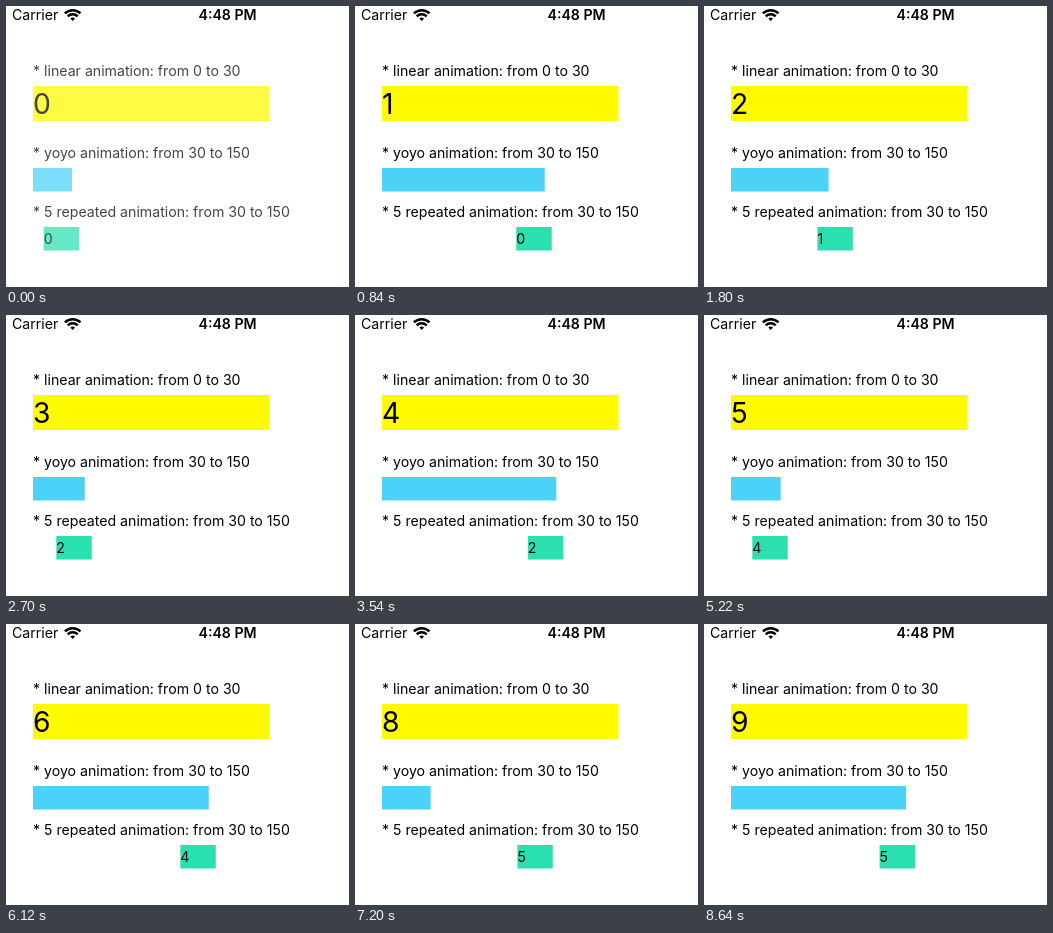
An HTML page that plays this animation: 343x281 px, repeating every 8700 ms.

```html
<!DOCTYPE html>
<html lang="en">
<head>
<meta charset="utf-8">
<title>Animated values</title>
<style>
  html, body { margin: 0; width: 100%; height: 100%; overflow: hidden; background: #fff; }
  svg { display: block; font: 14.15px Inter, "Liberation Sans", sans-serif; }
</style>
</head>
<body>
<svg width="343" height="281" viewBox="0 0 343 281">
  <text x="6" y="14">Carrier</text>
  <g fill="none" stroke="#000" stroke-width="2.5">
    <path d="M58.9 7.4a11 11 0 0 1 15.6 0"/>
    <path d="M61.7 10.4a7 7 0 0 1 10 0"/>
    <path d="M66.7 15l-2.3-2.4a3.3 3.3 0 0 1 4.6 0z" fill="#000" stroke="none"/>
  </g>
  <text x="192.5" y="14" font-weight="600">4:48 PM</text>

  <g id="content">
    <text x="27" y="70">* linear animation: from 0 to 30</text>
    <rect x="27" y="80" width="236.5" height="35" fill="#fffa00"/>
    <text id="counter" x="27" y="107.5" font-size="28.3"></text>

    <text x="27" y="152">* yoyo animation: from 30 to 150</text>
    <rect id="bar" x="27" y="162" height="23.5" fill="#4cd2f9"/>

    <text x="27" y="211">* 5 repeated animation: from 30 to 150</text>
    <g id="box">
      <rect y="221" width="35.4" height="23.5" fill="#2be0b0"/>
      <text id="repeat" y="238"></text>
    </g>
  </g>
</svg>
<script>
  const LOOP = 8700, STEP = 60, REPEATS = 5;
  const SCALE = 1.18, FROM = 30 * SCALE, RANGE = 120 * SCALE;
  const get = id => document.getElementById(id);
  const [content, counter, bar, box, repeat] =
    ['content', 'counter', 'bar', 'box', 'repeat'].map(get);

  const easeInOut = p => p < 0.5 ? 2 * p * p : 1 - 2 * (1 - p) ** 2;

  function draw(now) {
    const t = Math.floor(now % LOOP / STEP) * STEP / 1000;
    const phase = 0.114 + 0.7875 * t;
    const cycle = Math.floor(phase);
    const eased = easeInOut(phase - cycle);

    content.setAttribute('opacity', Math.min(1, 0.73 + 1.2 * t));
    counter.textContent = Math.floor(0.15 + t / 0.9);

    // The bar runs back and forth; the box restarts, then rests at the end.
    bar.setAttribute('width', FROM + RANGE * (cycle % 2 ? 1 - eased : eased));
    const x = FROM - 1.4 + RANGE * (cycle > REPEATS ? 1 : eased);
    box.setAttribute('transform', `translate(${x} 0)`);
    repeat.textContent = Math.min(cycle, REPEATS);
  }

  function tick() {
    draw(performance.now());
    requestAnimationFrame(tick);
  }
  tick();
</script>
</body>
</html>
```
